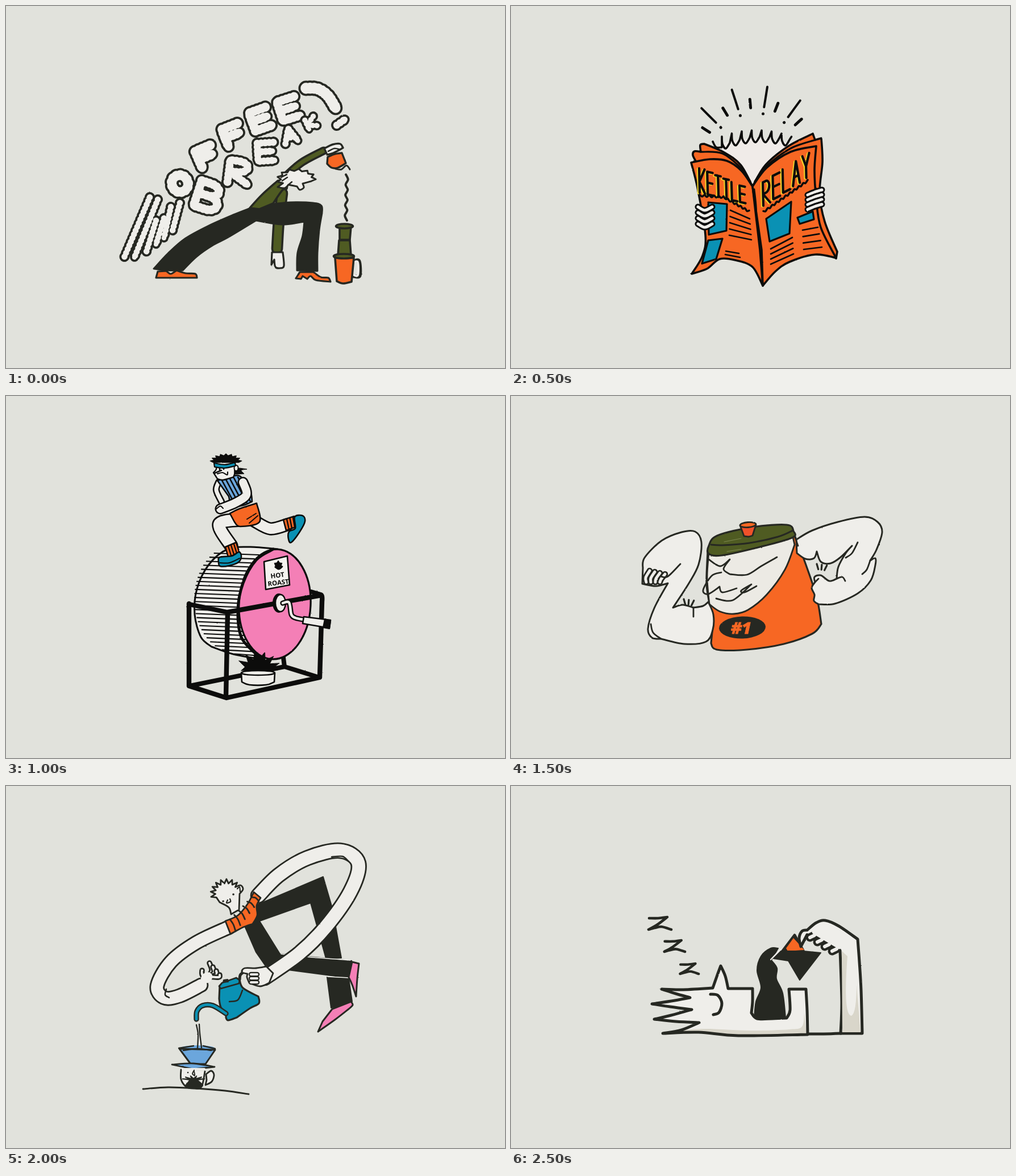
An HTML page that plays this animation: 878 by 638 pixels, repeating every 3000 ms.

```html
<!DOCTYPE html>
<html lang="en">
<head>
<meta charset="utf-8">
<title>Coffee loop</title>
<style>
html, body { margin: 0; width: 100%; height: 100%; overflow: hidden; background: #e1e2dc; }
svg { display: block; width: 878px; height: 638px; }
path, ellipse { stroke-linecap: round; stroke-linejoin: round; }
</style>
</head>
<body>
<svg id="stage" viewBox="0 0 878 638" xmlns="http://www.w3.org/2000/svg"></svg>
<script>
const BG = '#e1e2dc', INK = '#262822', BLACK = '#0c0c0b', WHITE = '#efeeea', ORANGE = '#f76723',
  OLIVE = '#4f5b22', TEAL = '#0a91b4', PINK = '#f47fb6', BLUE = '#6ba6dc', YELLOW = '#f4d52b', SHADE = '#d9d6ca';
const STEP = 500;
let ink = INK, weight = 4;

const lerp = (a, b, t) => a + (b - a) * t;
const rep = (n, fn) => Array.from({ length: n }, (_, i) => fn(i, n > 1 ? i / (n - 1) : 0)).join('');
const polar = (x, y, rx, ry, deg) => {
  const a = deg * Math.PI / 180;
  return `${(x + rx * Math.cos(a)).toFixed(1)} ${(y + ry * Math.sin(a)).toFixed(1)}`;
};

// Smooth curve through points; "/" makes a corner, "," starts a new stroke, "z" closes.
function curve(src) {
  if (src[0] === 'M') return src;
  return src.split(',').map(part => {
    const closed = part.includes('z');
    const runs = part.replace('z', '').split('/').map(r => {
      const n = r.trim().split(/\s+/).map(Number);
      return Array.from({ length: n.length / 2 }, (_, i) => [n[2 * i], n[2 * i + 1]]);
    });
    const loop = closed && runs.length === 1;
    let last = runs[0][0], out = 'M' + last;
    runs.forEach((run, k) => {
      const p = k ? [last, ...run] : run, n = p.length;
      const at = i => loop ? p[(i + n) % n] : p[Math.max(0, Math.min(n - 1, i))];
      for (let i = 0; i < (loop ? n : n - 1); i++) {
        const [a, b, c, e] = [at(i - 1), at(i), at(i + 1), at(i + 2)];
        const ease = (u, v, w) => [0, 1].map(j => (u[j] + (w[j] - v[j]) / 6).toFixed(1));
        out += 'C' + [ease(b, a, c), ease(c, e, b), c];
      }
      last = p[n - 1];
    });
    return out + (closed ? 'Z' : '');
  }).join('');
}
const shape = (src, fill = WHITE, w = weight, col = ink, extra = '') =>
  `<path d="${curve(src)}" fill="${fill}" stroke="${w ? col : 'none'}" stroke-width="${w}" ${extra}/>`;
const line = (src, w = weight, col = ink, extra = '') => shape(src, 'none', w, col, extra);
const oval = (x, y, rx, ry, fill, w = weight, rot = 0) =>
  `<ellipse cx="${x}" cy="${y}" rx="${rx}" ry="${ry}" fill="${fill}" stroke="${w ? ink : 'none'}" stroke-width="${w}" transform="rotate(${rot} ${x} ${y})"/>`;
// Outlined limb of even width.
const tube = (src, w, fill = WHITE, edge = weight) => line(src, w + 2 * edge) + line(src, w, fill);
// n lines blending from segment a to segment b.
const hatch = (n, a, b, w) => line(rep(n, (i, t) => {
  const [x, y, u, v] = a.map((q, k) => lerp(q, b[k], t).toFixed(1));
  return `M${x} ${y}L${u} ${v}`;
}), w);
// Jagged arc, used for hair and flames.
const burst = (x, y, rx, ry, depth, from, to, n) => rep(2 * n + 1, (i, t) =>
  (i ? ' / ' : '') + polar(x, y, rx * (i % 2 ? 1 : 1 - depth), ry * (i % 2 ? 1 : 1 - depth), lerp(from, to, t)));
const wave = (x, y, x2, y2, n, dx, dy, w) => line(rep(n + 1, (i, t) => {
  const s = i % 2 ? 1 : -1;
  return ` ${lerp(x, x2, t) + dx * s} ${lerp(y, y2, t) + dy * s}`;
}), w);

const GLYPHS = {
  A: 'M0 1L.5 0 1 1M.2 .65H.8', E: 'M1 0H0V1H1M0 .48H.9', F: 'M1 0H0V1M0 .5H.9', K: 'M0 0V1M1 0L0 .55 1 1',
  L: 'M0 0V1H1', T: 'M0 0H1M.5 0V1', Y: 'M0 0L.5 .5 1 0M.5 .5V1', R: 'M0 1V0H.4C1.1 0 1.1 .5 .4 .5H0L1 1',
  O: 'M.5 0C1.2 0 1.2 1 .5 1S-.2 0 .5 0', B: 'M0 0V1H.5C1.1 1 1.1 .48 .5 .48H0M0 0H.4C1 0 1 .48 .4 .48'
};

// Steam: a fat stroke with rows of dots that scallop its edge.
function steam(src, w, place = '') {
  return [[ink, 7.6], [WHITE, 0]].map(([col, b]) => {
    const at = 'vector-effect="non-scaling-stroke" ' + place;
    return line(src, w + b, col, at) + line(src, w + b + 2.5, col, at + ' stroke-dasharray="0.1 7"');
  }).join('');
}
// Letters placed along a quadratic arc p-q-r.
function steamWord(word, p, q, r, size, thick, tilt) {
  return rep(word.length, (i, t) => {
    const [x, y] = p.map((v, k) => lerp(lerp(v, q[k], t), lerp(q[k], r[k], t), t));
    const s = lerp(...size, t);
    return steam(GLYPHS[word[i]], lerp(...thick, t),
      `transform="translate(${x} ${y}) rotate(${lerp(...tilt, t)}) scale(${s * .9} ${s}) translate(-.5 -.5)"`);
  });
}

function lunge() {
  ink = INK; weight = 3.6;
  return steam('253 337 208 443,267 341 226 443,264 378 247 433,278 374 264 420,290 354 278 409,306 347 293 396', 8) +
    steamWord('OFFEE', [306, 313], [397, 208], [497, 181], [30, 35], [15, 13], [-25, -18]) +
    steamWord('BREAK', [357, 336], [467, 243], [537, 206], [46, 18], [13, 7], [18, -25]) +
    steam('528 145 548 146 566 158 580 180', 17) + steam('582 210 596 200', 10) +
    tube('486 330 480 380 477 428', 13.5, OLIVE) +
    shape('428 357 400 368 355 388 315 410 285 436 260 463 / 285 466 311 466 / 335 442 365 421 392 407 440 378 / 485 385 525 380 / 522 405 513 435 512 466 / 548 467 / 548 435 551 395 556 365 / 555 352 540 347 500 346 470 349z', INK, 3) +
    tube('488 304 520 276 559 255', 7.5, OLIVE) +
    shape('429 356 450 333 478 308 / 497 304 / 494 322 / 486 325 470 348 / 446 358z', OLIVE) +
    shape('468 434 467 456 / 472 447 / 474 460 482 462 489 458 487 434z', WHITE, 3.2) +
    shape(burst(511, 305, 34, 18, .2, 150, 375, 8) + ' / 522 313 / 524 320 517 324 512 318 / 497 315 / 490 321 478 319z', WHITE, 3) +
    line('484 302 494 297,486 308 495 302,497 315 503 310', 2.5) +
    shape('560 251 575 244 588 243 593 250 / 576 259 565 262z', WHITE, 3.4) + line('567 256 578 251 588 253', 2.6) +
    shape('566 266 / 578 261 591 259 / 598 277 / 584 285 573 285 565 278z', ORANGE, 3.4) +
    line('580 287 590 288 599 281 605 288', 3) +
    wave(600, 297, 598, 378, 9, 2, 0, 4) +
    shape('M587 390L607 389 605 412 587 412Z', OLIVE) + shape('M586 413H605L607 440H584Z', OLIVE) + oval(595.5, 388, 15, 4, OLIVE) +
    line('612 450 621 450 622 475 612 476', 7) + line('612 452 619 452 619 474 612 474', 4, WHITE) +
    shape('579 444 582 485 / 593 489 608 486 / 612 444z', ORANGE) + oval(594.5, 441, 18, 4, OLIVE) +
    shape('267 468 264 479 / 336 479 / 333 472 316 471 300 466 / 290 472 282 467z', ORANGE, 3.2) +
    shape('517 469 510 480 / 519 481 / 522 476 / 530 481 / 536 476 545 483 571 486 / 567 479 554 478 541 469z', ORANGE, 3.2);
}

// Hand-lettered masthead on a slanted page.
function masthead(word, x, y, dx, dy, w, h, dh, slope) {
  const row = (ox, oy, col) => rep(word.length, i => line(GLYPHS[word[i]], 4.2, col,
    `vector-effect="non-scaling-stroke" transform="matrix(${w} ${w * slope} 1 ${h + dh * i} ${x + dx * i + ox} ${y + dy * i + oy})"`));
  return `<g aria-label="${word}">${row(-2, 1, YELLOW)}${row(0, 0, BLACK)}</g>`;
}

function paper() {
  ink = BLACK; weight = 3.6;
  const ray = (deg, r1, r2, w) => line(`${polar(430, 275, r1, r1, deg - 90)} ${polar(430, 275, r2, r2, deg - 90)}`, w);
  const hair = rep(8, i => {
    const x = 371 + 17.5 * i, y = 219 + .003 * (x - 432) ** 2;
    return `${i ? ' / ' : ''}${x} ${y} / ${x + 1} ${y + 13} ${x + 7} ${y + 21} ${x + 14} ${y + 11}`;
  });
  const fingers = (x, y, side, step) => rep(4, i =>
    tube(`${x} ${y + step * i} ${x + 12} ${y + step * i + (side < 0 ? 6 : -5)} ${x + 25} ${y + step * i + (side < 0 ? 0 : -9)}`, 5, WHITE, 3));
  return rep(4, i => ray(27 * i - 45, 98, 134, 4) + ray(27 * i - 45, 86, 86.2, 5)) +
    rep(5, i => ray(26 * i - 57, 96, 111, 5)) +
    shape('366 252 / 380 240 430 234 495 242 / 425 314z', '#f0ebe8', 0) +
    line('355 239 361 249 371 249 / ' + hair.replace(/ \/ [^/]+$/, ''), 3.6) +
    shape('326 275 / 320 263 323 256 334 257 / 333 245 340 243 / 375 258 404 280 425 318z', ORANGE) +
    line('334 257 372 260 405 286 421 309', 3.2) +
    shape('425 318 / 448 280 488 247 531 225 / 535 236 / 546 233 / 548 275 543 330 552 380 574 433 / 572 445z', ORANGE) +
    line('429 309 450 282 492 251 535 236', 3.2) +
    shape('425 318 / 405 290 380 273 350 270 317 276 / 328 320 342 403 337 440 318 472 / 345 463 367 446 395 448 425 460 443 493 / 438 430z', ORANGE) +
    shape('425 318 / 450 285 492 257 537 247 / 534 290 537 340 545 390 572 444 / 535 438 490 451 465 468 443 493 / 441 430z', ORANGE) +
    line('428 323 431 350 432 378,436 400 440 445 443 490', 2.8) +
    masthead('KETTLE', 331, 286, 14.2, 6.1, 9.5, 43, -2.8, .22) +
    masthead('RELAY', 443, 311, 17.4, -11.5, 12, 41, 0, -.5) +
    wave(332, 334, 374, 337, 10, 0, 1.5, 3.5) + wave(374, 337, 419, 362, 12, 0, 1.5, 3.5) + wave(444, 363, 522, 308, 20, 0, 1.5, 3.5) +
    shape('M347 346L380 349 379 396 348 403ZM347 413L372 410 361 446 336 454ZM449 375L493 345 490 401 455 415ZM504 373L531 362 533 376 508 384Z', TEAL, 3.2) +
    hatch(5, [386, 360, 420, 375], [384, 404, 423, 412], 2.7) + hatch(2, [378, 432, 401, 436], [377, 438, 403, 443], 2.7) +
    hatch(4, [457, 428, 495, 408], [457, 455, 497, 437], 2.7) + hatch(4, [513, 395, 540, 390], [515, 429, 547, 425], 2.7) +
    fingers(329, 354, -1, 10) + fingers(522, 333, 1, 8.5);
}

function drum() {
  ink = BLACK; weight = 2.6;
  const edge = (x, rx, cy, ry, y) => x - rx * Math.sqrt(Math.max(0, 1 - ((y - cy) / ry) ** 2));
  const slats = rep(26, i => {
    const y = 277 + 7.1 * i;
    return `M${edge(402, 70, 358, 94, y).toFixed(1)} ${y}L${edge(473, 64, 367, 100, y).toFixed(1)} ${y + 3}`;
  });
  const label = (s, x, y) => `<text x="${x}" y="${y}" font-size="11.5" font-weight="700" text-anchor="middle" font-family="'Open Sans', sans-serif" fill="${BLACK}">${s}</text>`;
  const crank = '487 365 498 364 502 385 509 391 523 394';
  return line('M323 511L490 477 551 496M487 453L490 477M537 345L554 350', 8) +
    shape('478 270 430 266 390 270 357 297 336 340 332 385 343 425 362 442 / 400 455 450 464z', WHITE, 3) + line(slats, 2.1) +
    line('M322 367L389 381', 8) +
    oval(473, 367, 63, 97, PINK, 3.2, 3) +
    line('470 270 440 289 417 330 408 378 415 427 447 461', 5) +
    shape(burst(444, 484, 40, 34, .38, 198, 350, 6) + ' / 472 484 / 414 484z', BLACK, 1) +
    shape('414 488 / 415 504 / 428 509 458 509 472 504 / 473 488z', WHITE, 2.6) + oval(443.5, 488, 29.5, 4, WHITE, 2.4) +
    line('M322 366V511L388 532 552 496M390 381L387 531M390 381L555 351Q557 352 556 362L552 496', 8.4) +
    shape('M454 292L495 282 499 333 457 341Z', '#f4f3ef') +
    shape(burst(479, 299, 8, 9, .35, 180, 360, 3) + ' / 487 301 480 306 473 302z', BLACK, 1) +
    `<g transform="rotate(-7 478 320)">${label('HOT', 478, 320)}${label('ROAST', 478, 333)}</g>` +
    oval(480, 365, 10, 16, BLACK, 2) + oval(483, 365, 9, 15, WHITE, 2.4) + tube(crank, 4.5, WHITE, 2.4) +
    shape('M524 389L571 395 569 409 522 401Z') + shape('M561 393L571 396 569 410 558 408Z', BLACK, 2) +
    tube('374 152 370 166 379 186', 7) +
    tube('438 221 465 234 494 227', 18) +
    shape('M488 218L507 212 512 230 493 237Z', ORANGE) + hatch(3, [494, 217, 498, 235], [505, 214, 508, 231], 2.4) +
    shape('508 213 522 211 526 221 517 239 502 258 497 252 498 239 509 233z', TEAL) +
    tube('412 218 375 226 396 264', 20) +
    shape('M386 266L405 258 411 277 391 284Z', ORANGE) + hatch(3, [391, 265, 396, 281], [401, 261, 406, 277], 2.4) +
    shape('374 293 376 284 397 282 410 275 414 283 409 293 393 299 377 300z', TEAL) + line('376 294 393 294 411 286', 2) +
    shape('394 207 / 410 199 441 189 / 446 222 412 230 402 222z', ORANGE) + line('440 207 424 217,443 211 428 224', 2) +
    shape('372 149 / 382 146 405 140 413 142 / 430 168 433 186 / 420 192 396 197 / 392 177z', BLUE) +
    hatch(5, [379, 147, 404, 193], [408, 143, 430, 186], 2.6) +
    tube('417 152 423 174 404 188 377 199', 14) + line('370 199 377 194 382 198', 2) +
    shape('369 122 370 129 365 135 / 372 146 / 382 148 400 143 / 408 124z', '#f1f0ec', 2.4) +
    shape('402 128 410 127 424 129 / 414 131 419 137 / 402 138z', BLACK, 1) + oval(405, 127, 3.5, 5, WHITE, 2) +
    line('M376 128v2M383 127v2M367 136L379 131', 2.6) + line('372 137 381 135 389 139 390 134', 2.2) +
    shape(burst(387, 117, 28, 15, .22, 180, 360, 9) + 'z', BLACK, 1.5) +
    shape('366 118 385 121 403 117 / 404 123 / 385 127 367 125z', TEAL, 2.2);
}

function jar() {
  ink = INK; weight = 2.8;
  const flex = (x, y) => line(rep(3, i => `M${x + 9 * i} ${y}l${4 - 3.5 * i} 9`), 3.2, ink, `transform="rotate(8 ${x} ${y})"`);
  return shape('346 275 344 330 349 365 355 395 352 436 / 362 447 415 447 480 437 530 419 546 402 / 538 355 518 295 496 238z', ORANGE, 3.2) +
    shape('348 276 / 345 320 349 367 / 368 380 392 384 417 377 450 350 482 306 499 262 / 494 240z', '#eceae4') +
    line('348 288 368 300 385 288 / 374 305 385 314 / 415 315 440 300 468 284,370 311 353 317 338 342 347 349 367 336 / 372 346 397 339,361 357 390 360 423 332 / 405 343 411 346 432 335') +
    shape('348 264 363 246 425 231 485 227 497 238 494 250 430 268 370 281 348 278z', OLIVE, 3.2) +
    line('352 262 372 263 420 259 470 248 496 237', 3) + line('380 274 405 270,375 257 405 251', 1.2, '#7d8750') +
    shape('403 228 / 410 247 / 418 248 425 246 / 431 227z', '#f0512a') + oval(417, 227, 14, 4.5, ORANGE, 2.8, -4) +
    shape('232 304 / 235 285 265 255 300 240 324 239 335 258 330 297 313 330 285 373 / 302 368 321 373 / 338 370 347 363 / 356 385 355 412 343 433 305 437 264 428 / 248 426 241 410 252 374 276 330 / 255 335 231 331z', WHITE, 3) +
    rep(4, i => tube(`${244 + 9 * i} ${308 + 2 * i} ${237 + 9 * i} ${320 + i} ${238 + 8 * i} 328`, 5)) +
    line('264 318 276 318 298 296,321 373 321 389,246 402 250 417 264 428') + flex(304, 358) +
    shape('502 253 530 237 575 222 622 213 645 222 653 240 643 271 632 290 / 641 286 641 298 633 325 610 348 570 366 541 367 / 533 361 534 350 529 338 535 328 / 534 319 545 316 560 326 573 322 / 576 301 589 277 600 264 / 580 284 562 295 545 292 538 274 / 533 286 518 287 503 277z', WHITE, 3) +
    line('573 322 583 319 588 326,632 290 626 306 618 314,610 258 600 277 589 285,535 328 541 322,499 247 505 264') + flex(538, 296) +
    oval(407, 408, 41, 19.5, INK, 0, -2) +
    `<text x="405" y="418.5" font-size="29" font-weight="800" font-style="italic" text-anchor="middle" font-family="'Open Sans', 'Noto Sans', sans-serif" fill="${ORANGE}" stroke="${ORANGE}" stroke-width=".8">#1</text>`;
}

function pour() {
  ink = INK; weight = 2.8;
  return shape('M438 211L558 160 574 215 590 303 563 304 536 206 446 238 482 296 608 308 602 338 458 319 440 293 420 247ZM565 337L603 339 609 380 572 391Z', INK, 2) +
    line('484 296 540 302 606 307,566 336 604 338', 1.6, '#f5f5f0') +
    shape('609 310 / 621 313 / 618 340 616 371 / 609 350 603 337z', PINK, 3) +
    shape('574 393 607 380 / 610 386 603 393 / 580 411 549 433 / 557 415z', PINK, 3) +
    tube('444 193 480 157 530 127 588 114 620 136 606 186 562 249 515 296 455 338', 23) +
    line('573 125 592 124 603 133', 2.5) +
    tube('392 249 335 276 290 310 266 352 278 373 305 370 343 351', 21) + line('282 358 280 368 287 373', 2.5) +
    rep(4, i => tube(`355 336 ${362 + 4 * i} ${325 + 4 * i} ${358 + 6 * i} ${312 + 7 * i}`, 4)) +
    tube('350 340 345 332 345 325', 4) + oval(353, 338, 11, 9, WHITE, 0, -40) +
    shape(burst(388, 189, 28, 25, .3, 155, 322, 8) + ' / 413 175 417 182 411 190 / 410 218 / 396 226 / 392 214 376 205z') +
    line('407 181 411 178 412 186,390 201 388 206 395 204 394 199', 2.2) + line('M382 203h.1M400 191h.1', 3.6) +
    shape('386 238 / 408 228 425 208 436 187 / 448 197 / 441 211 442 228 434 243 / 417 249 395 261z', ORANGE) +
    rep(6, (i, t) => line(`${lerp(394, 432, t)} ${lerp(235, 196, t)} ${lerp(400, 439, t)} ${lerp(244, 197, t)} ${lerp(404, 445, t)} ${lerp(256, 203, t)}`)) +
    shape('376 352 390 347 411 341 / 417 356 444 371 / 445 383 429 392 406 408 / 391 413 387 408 388 402 / 378 390 375 375z', TEAL, 3.2) +
    line('393 380 408 377 416 360', 2.5) + shape('M375 353L380 347 405 338 411 342 410 348 378 357Z', TEAL) + shape('M382 346L383 342 390 341 391 345Z', INK, 2) +
    tube('335 411 336 397 346 387 364 387 387 401', 4.6, TEAL, 2.4) +
    line('411 341 413 332 424 326 440 325', 5) +
    shape('463 347 447 353 428 347 / 424 337 425 331 / 415 328 420 321 440 321 458 318 / 470 330z') +
    rep(3, i => tube(`431 ${332 + 7 * i} 442 ${332 + 7 * i}`, 4, WHITE, 2.2)) +
    shape('M335 421L337 461H345L340 421Z', WHITE, 0) + oval(337, 462, 30, 5, BLUE, 0) +
    line('335 421 338 438 337 462,340 420 341 436 344 461', 2.4) +
    shape('M305 463L368 465 351 490 325 490Z', BLUE, 3) + line('304 462 330 458,347 458 368 463,312 466 337 463 361 466', 2.4) +
    shape('292 491 330 489 367 495 / 330 499z', BLUE) +
    shape('308 500 308 517 317 530 330 533 344 530 350 503', WHITE) + line('M311 499H349', 4, WHITE) +
    shape(burst(330, 518, 20, 7, .7, 180, 360, 6) + ' / 346 528 331 533 315 529z', INK, 2) +
    line('331 501 328 507 332 510 331 503', 2) + line('M320 505h.1M342 514h.1', 2.6) +
    shape('352 508 361 502 366 509 362 521 351 527 / 353 518z') +
    line('241 534 285 531 335 533 385 537 427 543');
}

function nap() {
  ink = INK; weight = 5;
  const zeds = rep(3, i => line('-18 -9 -2 -9 14 -11 / -3 2 -19 11 / -8 8 4 6 21 11', 4.6 + .4 * i, INK,
    `transform="translate(${261 + 26 * i} ${242 + 40 * i}) scale(${1 - .09 * i})"`));
  const body = '265 358 300 359 355 356 / 362 336 369 317 / 377 335 382 357 / 425 357 / 425 380 423 400 / 433 410 460 410 485 409 / 491 395 489 358 / 519 358 / 521 395 522 438 / 400 440 330 434 267 436 / 300 430 331 417 / 290 415 252 411 / 282 404 318 394 / 280 389 248 384 / 282 379 315 373 / 290 366 265 358z';
  return zeds + shape(body, WHITE, 0) +
    shape('285 432 340 428 420 431 490 429 512 424 516 400 / 520 438 / 400 439z', SHADE, 0) +
    line(body) + line('351 367 364 369 371 383 366 399 356 403') +
    shape('428 408 / 431 380 440 355 433 325 440 300 457 286 470 286 / 458 307 / 468 321 467 340 478 365 483 408 / 456 411z', INK, 2) +
    shape('M471 300L499 263 514 290Z', INK) + shape('M484 286L497 268 516 289 487 291Z', ORANGE, 0) +
    shape('M462 304L475 291 514 291 545 294 508 342 488 308Z', INK, 2) + line('457 306 475 287', 2.2, WHITE) +
    shape('510 283 / 507 268 512 256 521 254 / 537 241 553 237 577 247 610 270 / 613 310 616 360 618 436 / 580 436 / 582 380 579 290 / 560 284 521 262z') +
    shape('M583 434L582 291 592 300 Q584 404 599 405 Q608 400 608 350L615 434Z', SHADE, 0) +
    rep(4, i => tube(`${534 + 13 * i} ${263 + 8 * i} ${526 + 13 * i} ${267 + 8 * i}`, 6, WHITE, 4.4)) +
    line('534 257 578 283', 9, WHITE) +
    line('522 437 550 437 580 436');
}

const stage = document.getElementById('stage');
stage.innerHTML = `<defs><filter id="brush" filterUnits="userSpaceOnUse" x="0" y="0" width="878" height="638" color-interpolation-filters="sRGB">
<feTurbulence type="fractalNoise" baseFrequency=".2" numOctaves="2" seed="4"/><feDisplacementMap in="SourceGraphic" scale="1.5" xChannelSelector="R" yChannelSelector="G"/></filter></defs>
<rect width="878" height="638" fill="${BG}"/>` +
  [lunge, paper, drum, jar, pour, nap].map(make => `<g class="scene" filter="url(#brush)">${make()}</g>`).join('');
const scenes = [...document.querySelectorAll('.scene')];

function draw(ms) {
  const now = Math.floor(ms / STEP) % scenes.length;
  scenes.forEach((g, i) => { g.style.display = i === now ? '' : 'none'; });
}
draw(0);
let start;
requestAnimationFrame(function tick(t) {
  start ??= t;
  draw(t - start);
  requestAnimationFrame(tick);
});
</script>
</body>
</html>
```
